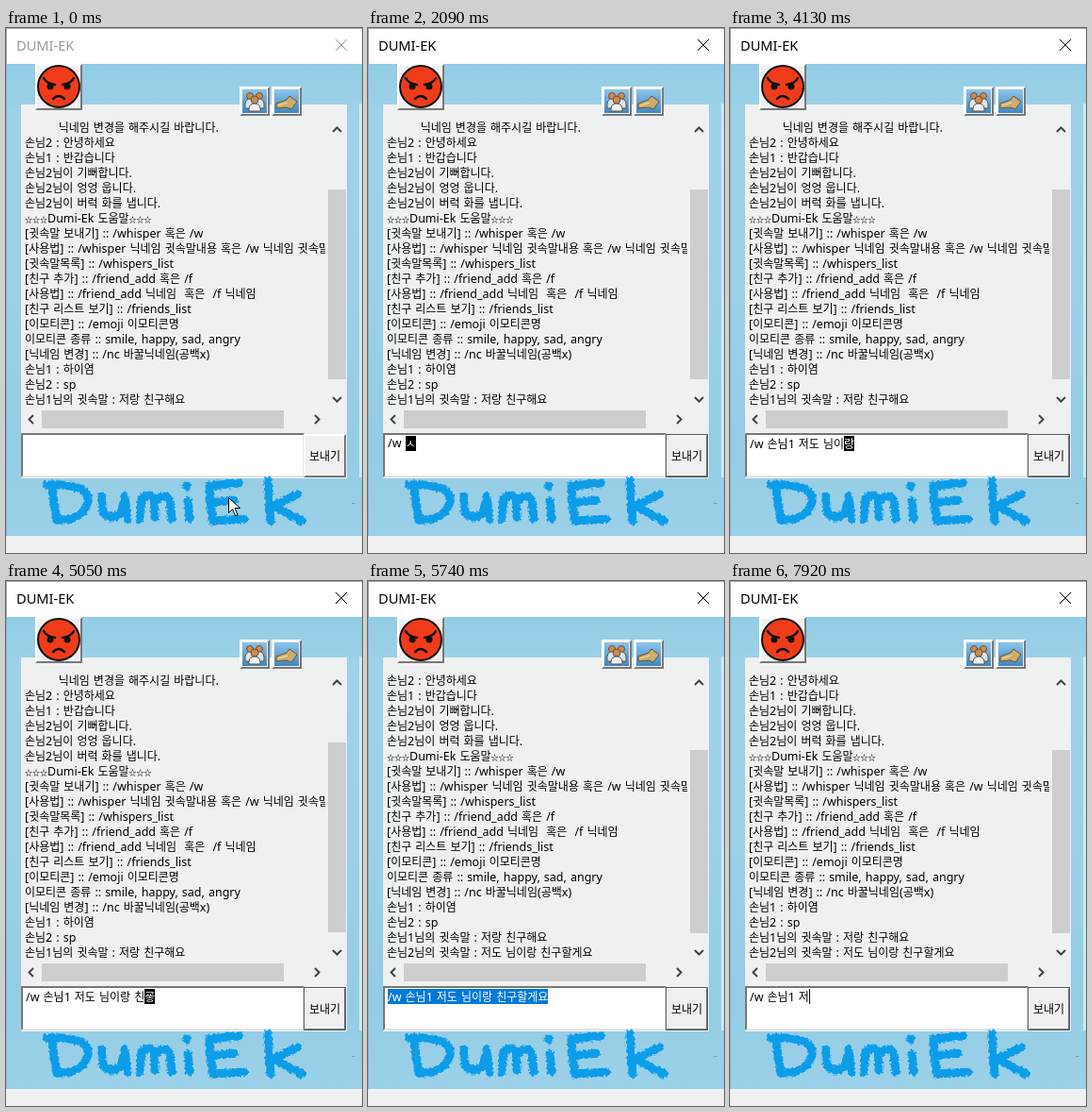
An HTML page that plays this animation: 378x556 px, repeating every 8 s.

```html
<!DOCTYPE html>
<html lang="ko">
<head>
<meta charset="utf-8">
<title>DUMI-EK</title>
<style>
html, body { margin: 0; width: 378px; height: 556px; overflow: hidden; }
body { position: relative; background: #f0f0f0; color: #000; font: 12.5px/16px "Noto Sans", sans-serif; }
body > * { position: absolute; box-sizing: border-box; }
b, .ko { font: 12px/16px "Noto Sans CJK KR", "Noto Sans CJK", sans-serif; }
i { font: bold 8px/16px "Noto Sans CJK KR", "Noto Sans CJK", sans-serif; }
#sky { left: 0; top: 38px; width: 378px; height: 500px; border-left: 1px solid #8fb4c4;
  background: linear-gradient(#92cce5, #9dd2e8 10%, #9bd0e7 50%, #93cce5 82%, #9bd1e8); }
#strip { left: 375px; top: 80px; width: 3px; height: 396px; background: #cfe8f3; }
#bar { left: 0; top: 0; width: 378px; height: 38px; background: #fff; border: solid #a5a5a5; border-width: 1px 0 0 1px; }
#title { left: 11px; top: 8px; font-size: 14.6px; line-height: 20px; color: #999; }
.active #title { color: #000; }
#panel { left: 16px; top: 81px; width: 346px; height: 396px; background: #eff0f0; }
#log { left: 20px; top: 97px; width: 319px; height: 305px; overflow: hidden; }
#log div, #input { height: 16px; white-space: pre; word-spacing: .8px; }
.thumb { background: #cdcdcd; }
#vthumb { left: 342px; width: 19px; }
#hthumb { left: 38px; top: 405px; width: 257px; height: 19px; }
#field { left: 16px; top: 429px; width: 301px; height: 47px; background: #fff; border: 2px solid;
  border-color: #777 #e3e3e3 #e3e3e3 #777; }
#input { left: 21px; top: 432px; }
.raised { background: #f0f0f0; border: 2px solid; border-color: #fff #777 #777 #fff; }
#face { left: 31px; top: 38px; width: 50px; height: 49px; }
#friends { left: 248px; top: 62px; width: 32px; height: 31px; }
#whisper { left: 282px; top: 62px; width: 32px; height: 31px; }
#send { left: 316px; top: 430px; width: 45px; height: 46px; line-height: 42px; text-align: center; }
.active #send { outline: 1px solid #555; outline-offset: -1px; }
#art { left: 0; top: 0; }
.x { stroke: #999; }
.active .x { stroke: #000; }
.caret { display: inline-block; width: 1px; height: 16px; margin-right: -1px; background: #000; vertical-align: top; }
.comp, .sel { display: inline-block; height: 16px; color: #fff; vertical-align: top; }
.comp { background: #000; }
.sel { background: #0078d7; }
</style>
</head>
<body>
<div id="sky"></div>
<div id="strip"></div>
<div id="bar"></div>
<div id="title">DUMI-EK</div>
<div id="panel"></div>
<div id="log"></div>
<div id="vthumb" class="thumb"></div>
<div id="hthumb" class="thumb"></div>
<div id="field"></div>
<div id="input"></div>
<div id="face" class="raised"></div>
<div id="friends" class="raised"></div>
<div id="whisper" class="raised"></div>
<div id="send" class="raised ko">보내기</div>
<svg id="art" width="378" height="556" fill="none">
  <defs>
    <linearGradient id="blue" x2="0" y2="1"><stop stop-color="#8cc4ea"/><stop offset="1" stop-color="#3f87c2"/></linearGradient>
    <filter id="crayon" x="-5%" y="-20%" width="110%" height="140%">
      <feTurbulence type="fractalNoise" baseFrequency=".35" numOctaves="2" seed="4"/>
      <feDisplacementMap in="SourceGraphic" scale="5" xChannelSelector="R" yChannelSelector="G"/>
    </filter>
  </defs>
  <path class="x" d="M350 12l12 12M362 12l-12 12"/>
  <g stroke="#444" stroke-width="2">
    <path d="M347 110l4.500-4.500 4.500 4.500M347 391l4.500 4.500 4.500-4.500M29 410l-4.500 4.500 4.500 4.500M328 410l4.500 4.500-4.500 4.500"/>
  </g>
  <g stroke="#111" stroke-linecap="round">
    <circle cx="56" cy="62" r="22" fill="#f03c1a" stroke-width="2"/>
    <path stroke-width="2.500" d="M40 53q3 6 12 7M72 53q-3 6-12 7M50 75q6-6 12 0"/>
    <g fill="#111" stroke="none"><circle cx="47" cy="62" r="3.500"/><circle cx="65" cy="62" r="3.500"/></g>
  </g>
  <path fill="url(#blue)" d="M251 65h26v25h-26zM285 65h26v25h-26z"/>
  <g stroke="#6b5238">
    <g fill="#c98d50">
      <circle cx="259" cy="72" r="3.500"/><circle cx="269" cy="72" r="3.500"/>
      <path fill="#d5e6f2" d="M254 85v-5q1-5 5-5t5 5v5zM264 85v-5q1-5 5-5t5 5v5z"/>
      <circle cx="264" cy="76" r="4"/>
      <path fill="#eef4f8" d="M258 88v-3q1-5 6-5t6 5v3z"/>
    </g>
    <path fill="#cfae6a" d="M287 80l11-4 3-4 8 6-6 8-5-2-11 1z"/>
    <path stroke="#f3e3b7" d="M289 82l10-3"/>
  </g>
  <path stroke="#6fa6c0" d="M367 503.500h4"/>
  <g stroke="#0c9de8" stroke-width="9" stroke-linecap="round" stroke-linejoin="round" filter="url(#crayon)">
    <path d="M48 484L54 521M43 484Q94 482 86 505Q79 522 54 521"/>
    <path d="M102 496Q100 518 112 518Q124 518 126 496L129 520"/>
    <path d="M142 520L144 498Q154 491 157 500L158 518M158 502Q170 490 174 502L176 520"/>
    <path d="M193 501L195 520M192 485v1"/>
    <path d="M247 482L216 485L219 522L253 520M218 503L242 500"/>
    <path d="M278 480L281 522M309 494L284 506L314 522"/>
  </g>
  <path id="arrow" fill="#fff" stroke="#000" d="M0 0v16l4-4 3 7 2.500-1-3-7h5.500z"/>
  <path id="beam" stroke="#000" d="M-3-8h2.500l.5.500.5-.5H3M0-7.500V7.500M-3 8h2.500L0 7.500l.5.500H3"/>
</svg>
<script>
const LOOP = 8000, SENT = 5740;
const $ = id => document.getElementById(id);

const messages = [
  '         닉네임 변경을 해주시길 바랍니다.',
  '손님2 : 안녕하세요',
  '손님1 : 반갑습니다',
  '손님2님이 기뻐합니다.',
  '손님2님이 엉엉 웁니다.',
  '손님2님이 버럭 화를 냅니다.',
  '☆☆☆Dumi-Ek 도움말☆☆☆',
  '[귓속말 보내기] :: /whisper 혹은 /w',
  '[사용법] :: /whisper 닉네임 귓속말내용 혹은 /w 닉네임 귓속말내용',
  '[귓속말목록] :: /whispers_list',
  '[친구 추가] :: /friend_add 혹은 /f',
  '[사용법] :: /friend_add 닉네임  혹은  /f 닉네임',
  '[친구 리스트 보기] :: /friends_list',
  '[이모티콘] :: /emoji 이모티콘명',
  '이모티콘 종류 :: smile, happy, sad, angry',
  '[닉네임 변경] :: /nc 바꿀닉네임(공백x)',
  '손님1 : 하이염',
  '손님2 : sp',
  '손님1님의 귓속말 : 저랑 친구해요',
  '손님2님의 귓속말 : 저도 님이랑 친구할게요'
];

// "|" marks the syllable being composed; otherwise the caret closes the text
const to = '/w 손님1 ', body = to + '저도 님이랑 ', full = body + '친구할게요';
const typing = [
  [290, ''], [700, '|ㅈ'], [1150, ''], [1310, '/'], [1390, '/w'], [1690, '/w '],
  [2090, '/w |ㅅ'], [2160, '/w |소'], [2330, '/w |손'], [2400, '/w 손|님'], [2480, '/w 손님1'], [2630, to],
  [2880, to + '|ㅈ'], [2950, to + '|저'], [3030, to + '|젇'], [3100, to + '저|도'], [3180, to + '저도 '],
  [3350, to + '저도 |ㄴ'], [3420, to + '저도 |님'], [3500, to + '저도 님|ㅇ'], [3820, to + '저도 님|이'],
  [3970, to + '저도 님|일'], [4050, to + '저도 님이|라'], [4120, to + '저도 님이|랑'], [4200, body],
  [4280, body + '|ㅊ'], [4350, body + '|치'], [4430, body + '|친'], [4510, body + '친|ㄱ'], [4590, body + '친|구'],
  [5050, body + '친|굫'], [5120, body + '친구|하'], [5200, body + '친구|할'],
  [5350, body + '친구|핡'], [5430, body + '친구할|게'], [5510, body + '친구할|겡'], [5590, body + '친구할게|요'],
  [SENT, full, 'sel'], [6290, full, 'sel caret'], [6690, full],
  [6910, full.slice(0, -1)], [6990, full.slice(0, -2)], [7160, full.slice(0, -3)],
  [7620, body + '친'], [7690, to + '저도 님이랑'], [7770, to + '저도 님'], [7840, to + '저도'], [7920, to + '저']
];

const pointer = [
  [0, 'arrow', 236, 497], [70, 'arrow', 233, 491], [150, 'arrow', 224, 478],
  [220, 'beam', 215, 462], [290, 'beam', 211, 449], [450, '', 0, 0]
];

const markup = s => s.replace(/[가-힣ㄱ-ㅎ]+/g, '<b>$&</b>').replace(/☆+/g, '<i>$&</i>');
const span = (cls, s = '') => `<span class="${cls}">${markup(s)}</span>`;
const at = (steps, t) => steps.filter(s => s[0] <= t).pop();

function inputHtml(step) {
  if (!step) return '';
  const [, text, mode] = step;
  if (mode) return span('sel', text) + (mode.includes('caret') ? span('caret') : '');
  const [done, comp] = text.split('|');
  return markup(done) + (comp ? span('comp', comp) : span('caret'));
}

let typed, sent;

function draw() {
  const t = performance.now() % LOOP;
  document.body.classList.toggle('active', t >= 290);

  const step = at(typing, t);
  if (step !== typed || sent === undefined) $('input').innerHTML = inputHtml(typed = step);

  const after = t >= SENT;
  if (after !== sent) {
    sent = after;
    const first = sent ? 1 : 0;
    $('log').innerHTML = messages.slice(first, first + 19).map(m => `<div>${markup(m)}</div>`).join('');
    $('vthumb').style.top = (sent ? 179 : 171) + 'px';
    $('vthumb').style.height = (sent ? 194 : 201) + 'px';
  }

  const [, kind, x, y] = at(pointer, t);
  for (const id of ['arrow', 'beam']) {
    $(id).style.display = id === kind ? '' : 'none';
    $(id).setAttribute('transform', `translate(${x + .5} ${y + .5})`);
  }
  requestAnimationFrame(draw);
}
draw();
</script>
</body>
</html>
```
